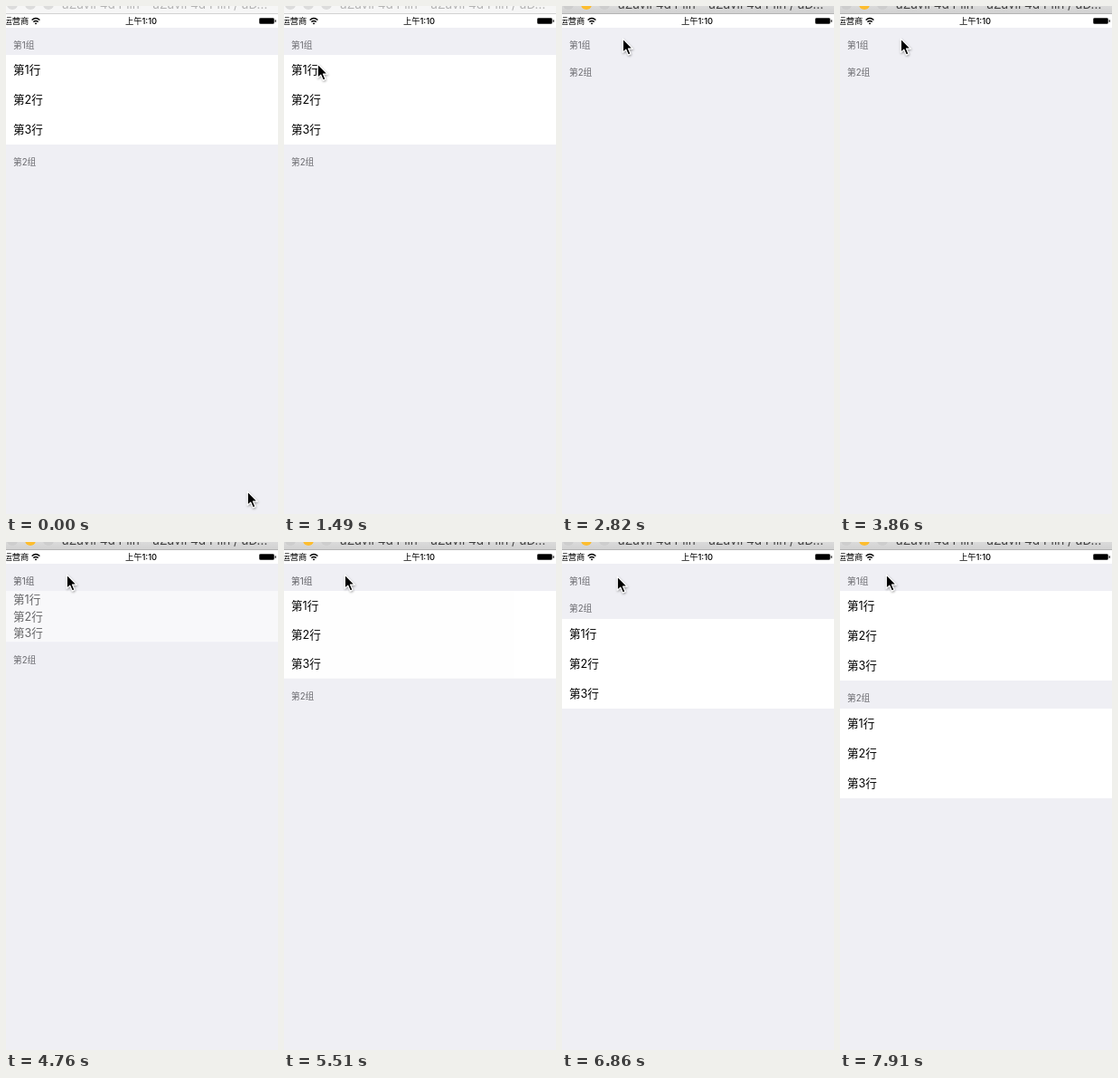
An HTML page for the animation above (8000 ms loop, 301 by 561 pixels).

```html
<!DOCTYPE html>
<html lang="zh">
<head>
<meta charset="utf-8">
<title>分组列表</title>
<style>
  html, body { margin: 0; width: 100%; height: 100%; overflow: hidden; background: #efeff4; }
  svg { display: block; font-family: Inter, "Noto Sans CJK SC", "Noto Sans CJK", sans-serif; }
  .head { font-size: 9.7px; fill: #69696e; }
  .busy { fill: #5c5c61; }
  .row { font-size: 12.6px; fill: #000; }
  .status { font-size: 9.3px; font-weight: 500; fill: #000; }
  .title { font-size: 13.6px; fill: #b4b4b4; }
  .bar { fill: #f6f6f6; }
  .edge { fill: #d2d2d2; }
  .dot { fill: #dcdcdc; }
  .active .title { fill: #404040; }
  .active .bar { fill: url(#chrome); }
  .active .edge { fill: #b4b4b4; }
  .active .dot { fill: #cdcdcd; }
  .active .mini { fill: #fdbd2e; }
</style>
</head>
<body>
<svg width="301" height="561" viewBox="0 0 301 561">
  <defs>
    <linearGradient id="chrome" x2="0" y2="1">
      <stop stop-color="#dadada"/><stop offset="1" stop-color="#d0d0d0"/>
    </linearGradient>
    <filter id="shade" x="-50%" y="-50%" width="220%" height="220%">
      <feDropShadow dx="0.5" dy="1.2" stdDeviation="1" flood-opacity=".4"/>
    </filter>
  </defs>
  <rect width="301" height="561" fill="#efeff4"/>

  <g id="window">
    <rect class="bar" width="301" height="9"/>
    <rect class="edge" y="8" width="301" height="1"/>
    <circle class="dot" cx="7" cy="-2" r="6"/>
    <circle class="dot mini" cx="27" cy="-2" r="6"/>
    <circle class="dot" cx="47" cy="-2" r="6"/>
    <text class="title" x="62" y="3">aZavil 4d Plin – aZavil 4d Plin / aD...</text>
  </g>

  <rect y="9" width="301" height="15" fill="#fff"/>
  <text class="status" x="-2.6" y="20">运营商</text>
  <path d="M28.6 15.6Q33 11.6 37.4 15.6M30.3 17.6Q33 15.2 35.7 17.6" fill="none" stroke="#000" stroke-width="1.4"/>
  <path d="M33 20.4L31.6 18.9Q33 17.9 34.4 18.9Z"/>
  <text class="status" x="149.5" y="20" text-anchor="middle">上午1:10</text>
  <rect x="280.5" y="13.5" width="16" height="6" rx="1" stroke="#444"/>
  <rect x="297.6" y="15.2" width="1.2" height="2.6" rx=".6"/>

  <text id="head1" class="head" x="8" y="46.6">第1组</text>
  <g id="rows1"></g>
  <text id="head2" class="head" x="8">第2组</text>
  <g id="rows2"></g>

  <g id="cursor" filter="url(#shade)">
    <path d="M.3 .2V15.2L3.8 12.1L6.3 17.9L8.9 16.8L6.4 11.1H11.1Z" stroke="#fff" stroke-width="1.1" stroke-linejoin="round"/>
  </g>
</svg>
<script>
// The screen refreshes in even ticks; all times below are in ticks.
const LOOP = 8000, FIRST = 726, TICK = 149.2;
const ROW = 33, TOP = 54, GAP = 31, FOLD = 2.2;
const $ = id => document.getElementById(id);

// Clicks that fold or unfold each section in turn
const clicks1 = [11.8, 17.8, 18.8, 25.8, 31.8, 45.8];
const clicks2 = [38.8];

const moves = [
  { from: -1, to: 0, x: 176, y: 399 },
  { from: 1, to: 5, x: 37, y: 64 },
  { from: 6, to: 10, x: 67, y: 36 },
  { from: 34, to: 37, x: 66, y: 65 },
  { from: 38, to: 41, x: 61, y: 38 },
  { from: 41, to: 44, x: 51, y: 36 }
];

function ease(n, from, to) {
  const u = Math.min(1, Math.max(0, (n - from) / (to - from)));
  return u * u * (3 - 2 * u);
}

function openness(n, clicks, open) {
  return clicks.reduce((sum, c, i) =>
    sum + (open === i % 2 ? 1 : -1) * ease(n, c, c + FOLD), open);
}

function pointer(n) {
  let x = 267, y = 536;
  for (const m of moves) {
    const e = ease(n, m.from, m.to);
    x += (m.x - x) * e;
    y += (m.y - y) * e;
  }
  return [x, y];
}

function makeRows(group) {
  const cell = k => `<svg width="301"><text class="row" x="8">第${k}行</text></svg>`;
  group.innerHTML = '<rect width="301" fill="#fff"/>' + [1, 2, 3].map(cell).join('');
}

function layRows(group, top, open) {
  const [back, ...cells] = group.children, h = ROW * open;
  back.setAttribute('y', top);
  back.setAttribute('height', 3 * h);
  cells.forEach((cell, i) => {
    cell.setAttribute('y', top + h * i);
    cell.setAttribute('height', h);
    cell.firstChild.setAttribute('y', h / 2 + 4.5);
  });
  group.setAttribute('opacity', open);
  return top + 3 * h;
}

function draw(time) {
  const n = Math.floor((time % LOOP - FIRST) / TICK);
  const p1 = openness(n, clicks1, 1), p2 = openness(n, clicks2, 0);
  $('window').classList.toggle('active', n > clicks1[0]);
  $('head1').classList.toggle('busy', p1 > .001 && p1 < .999);
  const end = layRows($('rows1'), TOP, p1);
  $('head2').setAttribute('y', end + 23.4);
  layRows($('rows2'), end + GAP, p2);
  $('cursor').setAttribute('transform', `translate(${pointer(n)})`);
}

makeRows($('rows1'));
makeRows($('rows2'));
const start = performance.now();
function loop() {
  // n starts below -1, so clamp nothing: every ease is still at rest
  draw(performance.now() - start);
  requestAnimationFrame(loop);
}
loop();
</script>
</body>
</html>
```
